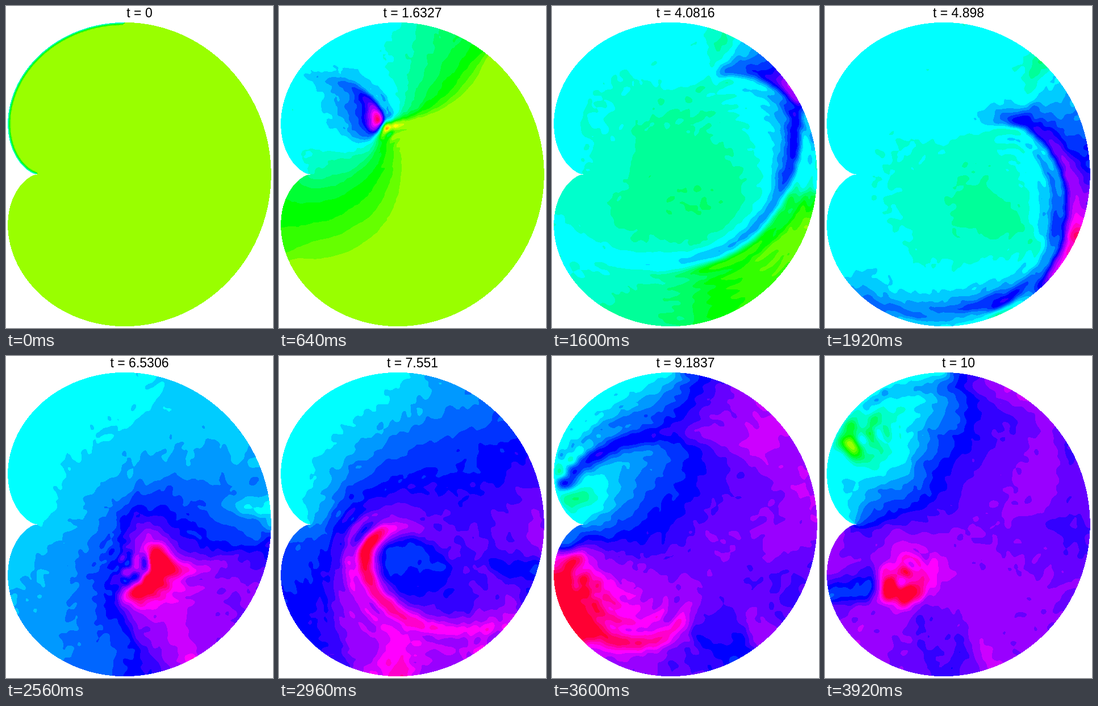
Write an HTML page with a canvas that moves like this. It is 470 px wide and 567 px high and loops after 4 s.

```html
<!DOCTYPE html>
<html lang="en">
<head>
<meta charset="utf-8">
<title>Wave in a cardioid</title>
<style>
  html, body { margin: 0; width: 100%; height: 100%; overflow: hidden; background: #fff; }
  canvas { position: absolute; left: 0; top: 0; }
  #label {
    position: absolute; left: 0; top: 0; width: 470px; height: 24px;
    font: 23px/24px "Liberation Sans", Arial, sans-serif;
    font-kerning: none; color: #000; text-align: center; white-space: pre;
  }
</style>
</head>
<body>
<canvas id="stage" width="470" height="567"></canvas>
<div id="label">t = 0</div>
<script>
// Wave equation u_tt = Δu in r = A(1 + cos θ), lengths in pixels.
// u = 1 on the arc θ in [60°, 180°]; the rest of the rim reflects freely.
const A = 206, CUSP_X = 54.7, CUSP_Y = 296.5;
const FRAMES = 50, FRAME_MS = 80, T_END = 10, UNIT = 103;
const H = 2, COLS = 240, ROWS = 272, X0 = -60, Y0 = -ROWS * H / 2;
const SIZE = COLS * ROWS;
const RAMP = 5;                                 // width of the initial edge
const STEPS = 44, DT = T_END / (FRAMES - 1) * UNIT / STEPS;
const MESH = 3.2;                               // short waves run ahead
const DISP = (MESH * MESH + H * H) / 12;
const DAMP = 0.04 / DT;

// Distance to the rim, positive inside, through z = A/2 (1 + w)^2
function depth(x, y) {
  const m = Math.sqrt(2 * Math.hypot(x, y) / A), half = Math.atan2(y, x) / 2;
  return (1 - Math.hypot(m * Math.cos(half) - 1, m * Math.sin(half))) * A * m;
}
const onArc = (x, y) => y > 0 && Math.atan2(y, x) >= Math.PI / 3;
const cellX = c => X0 + ((c % COLS) + 0.5) * H;
const cellY = c => Y0 + (Math.floor(c / COLS) + 0.5) * H;

function openPart(p, q) {
  if (p > 0 && q > 0) return 1;
  if (p <= 0 && q <= 0) return 0;
  return Math.max(p, q) / Math.abs(p - q);
}

function blockNoise(c) {
  const i = (c % COLS) >> 1, j = Math.floor(c / COLS) >> 1;
  const s = Math.sin(i * 12.9898 + j * 78.233) * 43758.5453;
  return s - Math.floor(s);
}

const deep = new Float64Array(SIZE), arc = new Uint8Array(SIZE);
const cells = [], rim = [];
let u = new Float64Array(SIZE), past = new Float64Array(SIZE);
const lap = new Float64Array(SIZE), lapOld = new Float64Array(SIZE);
const links = [1, -1, COLS, -COLS].map(step => ({ step, w: new Float64Array(SIZE) }));

function faceWeight(c, step) {
  const n = c + step, x = cellX(c), y = cellY(c), nx = cellX(n), ny = cellY(n);
  if (y > 0 && ny > 0) {
    if (deep[n] <= 0 && arc[n]) return 1 / Math.max(0.5, deep[c] / (deep[c] - deep[n]));
    if (deep[n] > 0 && arc[c] && arc[n]) return 1;
  }
  if (deep[n] <= 0) return 0;
  const mx = (x + nx) / 2, my = (y + ny) / 2;
  const dx = (ny - y) / 2, dy = (nx - x) / 2;
  return openPart(depth(mx - dx, my - dy), depth(mx + dx, my + dy));
}

function build() {
  for (let c = 0; c < SIZE; c++) {
    deep[c] = depth(cellX(c), cellY(c));
    arc[c] = onArc(cellX(c), cellY(c)) ? 1 : 0;
    if (deep[c] > 0) {
      cells.push(c);
      if (arc[c]) u[c] = Math.max(0, 1 - deep[c] / RAMP);
    } else if (arc[c]) u[c] = 1;
  }
  for (const c of cells) {
    const area = arc[c] ? 1 : Math.min(1, 0.5 + deep[c] / H);
    const mass = area * H * H * (0.8 + 0.4 * blockNoise(c));
    for (const l of links) l.w[c] = faceWeight(c, l.step) / mass;
  }
  // Cells just outside the free rim borrow the mean of their inner neighbours
  for (let c = COLS + 1; c < SIZE - COLS - 1; c++) {
    if (deep[c] > 0 || arc[c]) continue;
    const near = [];
    for (let j = -1; j <= 1; j++) for (let i = -1; i <= 1; i++) {
      const n = c + j * COLS + i;
      if (deep[n] > 0 && cellY(n) * cellY(c) > 0) near.push(n);
    }
    if (near.length) rim.push({ c, near });
  }
  past.set(u);
}
build();

const active = Int32Array.from(cells);
const [east, west, north, south] = links.map(l => l.w);

function laplace(f, c) {
  const v = f[c];
  return east[c] * (f[c + 1] - v) + west[c] * (f[c - 1] - v) +
         north[c] * (f[c + COLS] - v) + south[c] * (f[c - COLS] - v);
}

const bent = new Float64Array(SIZE);
for (const c of active) lapOld[c] = laplace(u, c);

function advance() {
  const n = active.length;
  for (let k = 0; k < n; k++) {
    const c = active[k], v = laplace(u, c);
    lap[c] = v;
    bent[c] = v + DAMP * (v - lapOld[c]);
    lapOld[c] = v;
  }
  for (let k = 0; k < n; k++) {
    const c = active[k];
    past[c] = 2 * u[c] - past[c] + DT * DT * (lap[c] - DISP * laplace(bent, c));
  }
  [u, past] = [past, u];
}

const fields = [];
function snapshot() {
  const f = Float32Array.from(u);
  for (const { c, near } of rim) {
    let sum = 0;
    for (const n of near) sum += u[n];
    f[c] = sum / near.length;
  }
  fields.push(f);
}
function fieldAt(n) {
  while (fields.length <= n) {
    if (fields.length) for (let s = 0; s < STEPS; s++) advance();
    snapshot();
  }
  return fields[n];
}

// 64 hues over u = -1 … 3, each channel in steps of 51
const palette = Uint32Array.from({ length: 64 }, (_, i) => {
  const hue = Math.min(i, 62) * 6 / 64;
  const channel = shift => {
    const k = (hue + shift) % 6;
    return Math.round(5 * Math.max(0, Math.min(1, Math.abs(k - 3) - 1))) * 51;
  };
  return (255 << 24 | channel(2) << 16 | channel(4) << 8 | channel(0)) >>> 0;
});

const canvas = document.getElementById('stage'), label = document.getElementById('label');
const ctx = canvas.getContext('2d');
const W = canvas.width, HT = canvas.height;
const image = ctx.createImageData(W, HT);
const pixels = new Uint32Array(image.data.buffer).fill(0xffffffff);
const inside = [];
for (let y = 0; y < HT; y++) for (let x = 0; x < W; x++) {
  if (depth(x + 0.5 - CUSP_X, CUSP_Y - y - 0.5) > 0) inside.push(y * W + x);
}

function paint(f) {
  for (const p of inside) {
    const x = p % W, y = (p - x) / W;
    const gx = (x + 0.5 - CUSP_X - X0) / H - 0.5, gy = (CUSP_Y - y - 0.5 - Y0) / H - 0.5;
    const i = Math.floor(gx), j = Math.floor(gy), fx = gx - i, fy = gy - j;
    const c = j * COLS + i;
    const low = f[c] + fx * (f[c + 1] - f[c]);
    const high = f[c + COLS] + fx * (f[c + COLS + 1] - f[c + COLS]);
    const level = Math.floor((low + fy * (high - low) + 1) * 16);
    pixels[p] = palette[Math.max(0, Math.min(63, level))];
  }
  ctx.putImageData(image, 0, 0);
}

let shown = -1;
function show(n) {
  if (n === shown) return;
  shown = n;
  paint(fieldAt(n));
  label.textContent = 't = ' + Number((n * T_END / (FRAMES - 1)).toPrecision(5));
}

show(0);
const start = performance.now();
function tick() {
  show(Math.floor((performance.now() - start) / FRAME_MS) % FRAMES);
  requestAnimationFrame(tick);
}
requestAnimationFrame(tick);
</script>
</body>
</html>
```
